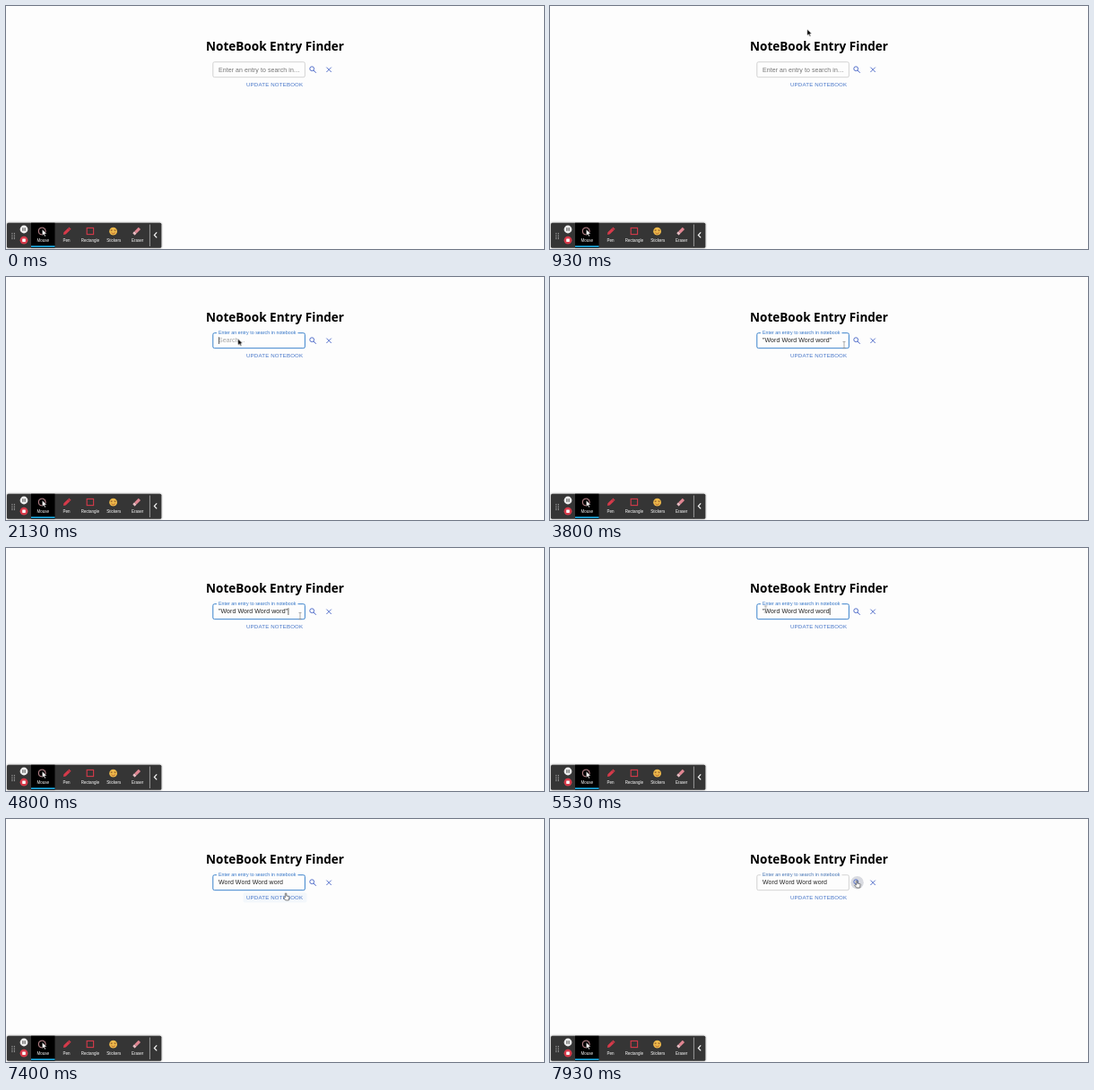
Animation, 600 px wide and 272 px high, one loop 8000 ms. Source, as an HTML page:

```html
<!DOCTYPE html>
<html lang="en">
<head>
<meta charset="utf-8">
<title>Entry finder</title>
<style>
html, body { margin: 0; width: 100%; height: 100%; overflow: hidden; background: #fdfdfd; }
svg { display: block; width: 600px; height: 272px; }
text { font-family: "Liberation Sans", Arial, sans-serif; }
.title { font: 700 13.55px "Noto Sans", sans-serif; text-anchor: middle; }
.field { font-size: 7px; letter-spacing: .0656px; }
.button { font-size: 6.125px; letter-spacing: .175px; fill: #4474c8; }
.tool { font: 500 4.5px Roboto, sans-serif; fill: #fff; text-anchor: middle; }
.icon { fill: none; stroke: #4c69c8; stroke-width: .95; }

/* 1% = 80ms */
.anim { animation: 8s step-end infinite; }
.outline { animation-name: outline; fill: none; }
.notch { animation-name: notch; }
.label { animation: label 8s infinite; }
.short { animation-name: short; }
.long { animation-name: long; }
.hint { animation: hint 8s linear infinite; }
.quoted { animation-name: quoted; }
.open { animation-name: open; }
.plain { animation-name: plain; }
.caret { animation-name: caret; }
.halo { animation: halo 8s linear infinite; }
.tint { animation-name: tint; }
.mouse { animation: mouse 8s infinite ease-in-out; }
.arrow { animation-name: arrow; }
.beam { animation-name: beam; }
.hand { animation-name: hand; }

@keyframes outline {
  0%, 98.25% { stroke: #c8c8c8; stroke-width: .8px; }
  20.75% { stroke: #6c6c6c; stroke-width: .8px; }
  24.125% { stroke: #3a82cc; stroke-width: 1px; }
}
@keyframes notch { 0% { opacity: 0; } 24.75%, 100% { opacity: 1; } }
@keyframes label {
  0%, 24.125% {
    transform: translate(237px, 73.7px); fill: #757575;
    animation-timing-function: cubic-bezier(0, 0, .2, 1);
  }
  26.5%, 98.25% { transform: translate(237px, 64.2px) scale(.75); fill: #2f72c6; }
  100% { transform: translate(237px, 64.2px) scale(.75); fill: #4571ad; }
}
@keyframes short { 0% { opacity: 1; } 24.125%, 100% { opacity: 0; } }
@keyframes long { 0% { opacity: 0; } 24.125%, 100% { opacity: 1; } }
@keyframes hint {
  0%, 24.125% { opacity: 0; }
  26.5%, 38.24% { opacity: 1; }
  38.25%, 100% { opacity: 0; }
}
@keyframes quoted { 0%, 63.25%, 100% { opacity: 0; } 38.25% { opacity: 1; } }
@keyframes open { 0%, 73.25%, 100% { opacity: 0; } 63.25% { opacity: 1; } }
@keyframes plain { 0% { opacity: 0; } 73.25%, 100% { opacity: 1; } }
@keyframes caret {
  0% { opacity: 0; transform: translateX(237px); }
  24.125% { opacity: 1; transform: translateX(237px); }
  31.625% { opacity: 0; transform: translateX(237px); }
  38.25%, 51.625%, 60% { opacity: 1; transform: translateX(314.4px); }
  44.875%, 58.25% { opacity: 0; transform: translateX(314.4px); }
  63.25% { opacity: 1; transform: translateX(311.7px); }
  70% { opacity: 1; transform: translateX(239.5px); }
  73.25%, 85.75% { opacity: 1; transform: translateX(237px); }
  79.125%, 92.375%, 100% { opacity: 0; transform: translateX(237px); }
}
@keyframes halo {
  0%, 94.5% { opacity: 0; }
  95.5%, 98.25% { opacity: .06; }
  99.1%, 100% { opacity: .15; }
}
@keyframes tint { 0%, 92.6%, 100% { opacity: 0; } 90.9% { opacity: .04; } }
@keyframes mouse {
  0%, 10.75% { transform: translate(288px, 24px); }
  15%, 19.125% { transform: translate(274px, 47px); }
  21.625% { transform: translate(261.5px, 67.5px); }
  24.125%, 42.5% { transform: translate(258.7px, 69.3px); }
  47.5%, 62.5% { transform: translate(328px, 76px); }
  68.75%, 70% { transform: translate(240.5px, 68.5px); }
  74.125%, 86.625% { transform: translate(256px, 108.7px); }
  96.625%, 100% { transform: translate(342.3px, 69px); }
}
@keyframes arrow {
  0%, 20.75%, 43.25%, 90.9%, 100% { opacity: 0; }
  10.75%, 24.125%, 71.125% { opacity: 1; }
}
@keyframes beam {
  0%, 24.125%, 71.125%, 94.5%, 100% { opacity: 0; }
  20.75%, 43.25%, 92.6% { opacity: 1; }
}
@keyframes hand {
  0%, 92.6% { opacity: 0; }
  90.9%, 94.5%, 100% { opacity: 1; }
}
</style>
</head>
<body>
<svg viewBox="0 0 600 272">
  <defs>
    <filter id="shadow" x="-10%" y="-30%" width="120%" height="160%">
      <feDropShadow dx="0" dy="0" stdDeviation="1.1" flood-opacity=".5"/>
    </filter>
    <path id="pointer" d="M0 0V7L1.7 5.5 2.8 8 3.9 7.5 2.8 5H5Z"/>
  </defs>

  <text class="title" x="300" y="49.6">NoteBook Entry Finder</text>

  <!-- search field -->
  <rect class="anim outline" x="230.8" y="62.7" width="102.6" height="17" rx="1.75"/>
  <rect class="anim notch" x="234.9" y="61" width="90.6" height="3" fill="#fdfdfd"/>
  <g class="label field">
    <text class="anim short">Enter an entry to search in…</text>
    <text class="anim long">Enter an entry to search in notebook</text>
  </g>
  <g class="field" fill="#222">
    <text class="hint" x="237" y="73.4" fill="#a4a4a4">Search…</text>
    <text class="anim quoted" x="237" y="73.4">"Word Word Word word"</text>
    <text class="anim open" x="237" y="73.4">"Word Word Word word</text>
    <text class="anim plain" x="237" y="73.4">Word Word Word word</text>
  </g>
  <rect class="anim caret" y="67.2" width=".7" height="7.8" fill="#222"/>

  <circle class="halo" cx="342.6" cy="71.2" r="7.2" fill="#101840"/>
  <g class="icon">
    <circle cx="341.2" cy="70.2" r="2.4"/>
    <path d="M343 72L345.8 74.8M357.4 68.6L362.8 74M362.8 68.6L357.4 74"/>
  </g>

  <rect class="anim tint" x="264.5" y="82.5" width="71" height="11" rx="1.75" fill="#1976d2"/>
  <text class="button" x="268" y="90.2">UPDATE NOTEBOOK</text>

  <!-- recorder toolbar -->
  <rect x="1" y="242.7" width="172.3" height="28" rx="1.5" fill="#353535" filter="url(#shadow)"/>
  <rect x="28" y="242.7" width="26.5" height="28" fill="#000"/>
  <rect x="28" y="268.3" width="26.5" height="1.7" fill="#1ba5dc"/>
  <path d="M6.9 254V261M9.4 254V261" stroke="#aaa" stroke-width="1.1" stroke-dasharray="1.1 .85"/>
  <circle cx="20" cy="250" r="4.4" fill="#eee"/>
  <path d="M18.9 248.2V251.8M21.1 248.2V251.8" stroke="#333" stroke-width=".9"/>
  <circle cx="20" cy="262.2" r="4.4" fill="#d63a4a"/>
  <rect x="18.2" y="260.4" width="3.6" height="3.6" rx=".4" fill="#fff"/>

  <circle cx="40.2" cy="252" r="4" fill="none" stroke="#e4a3aa" stroke-width=".9"/>
  <use href="#pointer" x="40.4" y="250" fill="#fff" stroke="#000" stroke-width=".4"/>
  <g transform="translate(67.8 252.2) rotate(45)" fill="#d63a4a">
    <path d="M-1.6 -5.2H1.6V-3.8H-1.6ZM-1.6 -3.4H1.6V3.2L0 5.4 -1.6 3.2Z"/>
  </g>
  <rect x="90.2" y="248.4" width="7.4" height="7.2" fill="none" stroke="#d63a4a" stroke-width="1.1"/>
  <circle cx="119.6" cy="252.2" r="4.4" fill="#edb84a"/>
  <path d="M116.8 251.2H118.5M120.7 251.2H122.4" stroke="#8a5428" stroke-width="1.3"/>
  <path d="M117.4 253.8Q119.6 256 121.8 253.8" fill="none" stroke="#b06030" stroke-width=".9"/>
  <g transform="translate(145.6 252.2) rotate(45)">
    <rect x="-1.7" y="-4.8" width="3.4" height="6.6" rx=".5" fill="#df8591"/>
    <rect x="-1.7" y="1.8" width="3.4" height="2.8" rx=".5" fill="#e9bcc2"/>
  </g>
  <g class="tool">
    <text x="41.2" y="263.7">Mouse</text>
    <text x="67.6" y="263.7">Pen</text>
    <text x="94" y="263.7">Rectangle</text>
    <text x="120.2" y="263.7">Stickers</text>
    <text x="146.6" y="263.7">Eraser</text>
  </g>
  <path d="M160.4 244.5V269" stroke="#b5b5b5" stroke-width=".8"/>
  <path d="M168.2 253.4L165.4 256.4 168.2 259.4" fill="none" stroke="#fff" stroke-width="1.2"/>

  <g class="mouse">
    <use class="anim arrow" href="#pointer" fill="#000" stroke="#fff" stroke-width=".4"/>
    <path class="anim beam" d="M-1.5 -3.6H1.5M0 -3.6V3.6M-1.5 3.6H1.5" stroke="#888" stroke-width=".7"/>
    <path class="anim hand" fill="#fff" stroke="#222" stroke-width=".6" stroke-linejoin="round"
      d="M-.7 .4Q0 -.6 .7 .4V3L3.4 3.6Q4 3.8 3.9 4.6L3.3 8H-.4L-2.4 5.2Q-2 4.2 -.7 5Z"/>
  </g>
</svg>
</body>
</html>
```
